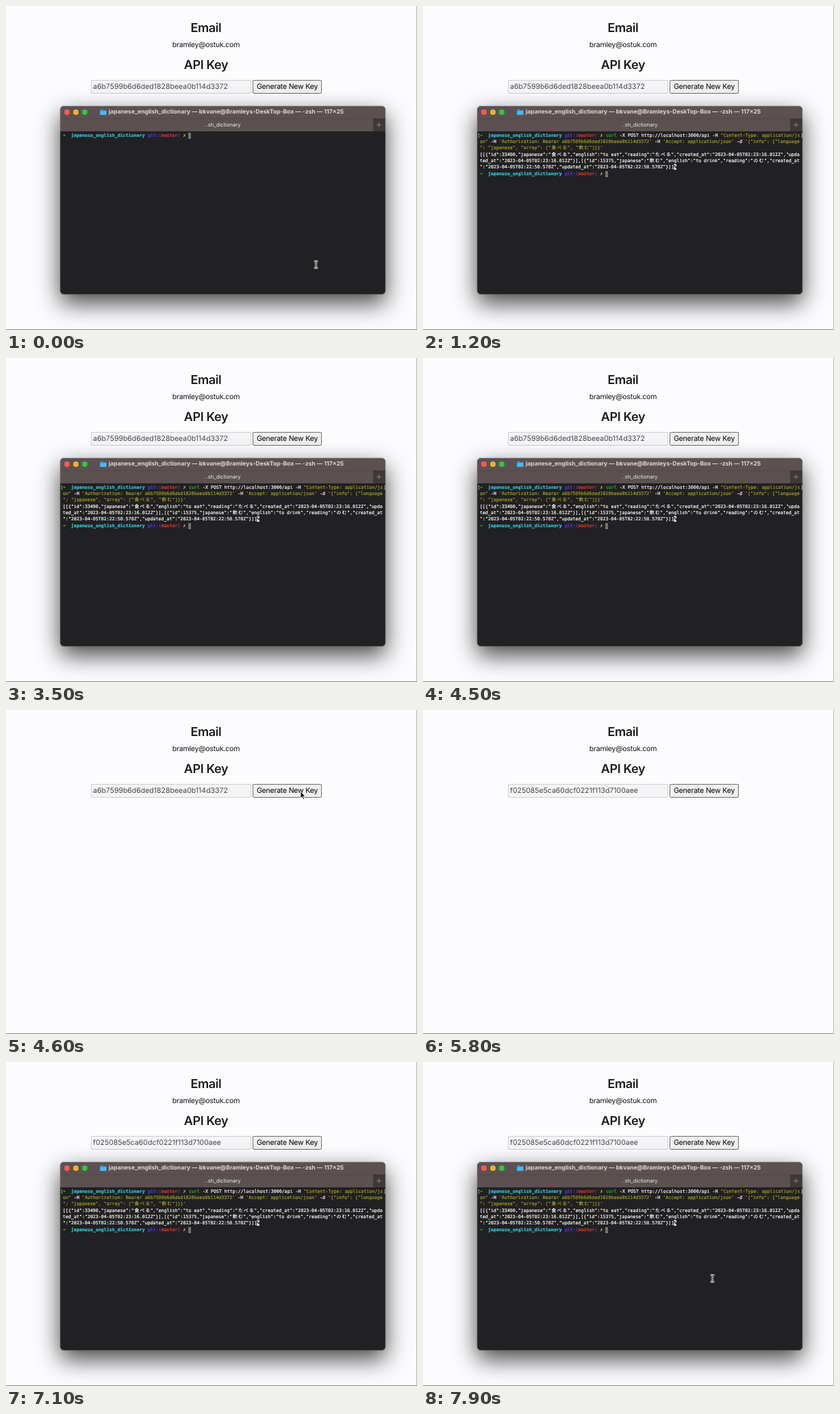
These frames come from a looping animation (600 px wide and 473 px high, 8 s). An HTML page:

```html
<!DOCTYPE html>
<html lang="en">
<head>
<meta charset="utf-8">
<title>API key demo</title>
<style>
  html, body { margin: 0; width: 100%; height: 100%; overflow: hidden; background: #fcfbfd; }
  .stage {
    position: relative; width: 600px; height: 473px; overflow: hidden; box-sizing: border-box;
    background: #fcfbfd; border-right: 1px solid #b4b3b5; border-bottom: 1px solid #8d8c8e;
    font-family: Inter, "Liberation Sans", sans-serif; color: #1d1d1f;
    text-rendering: geometricPrecision; cursor: default;
  }
  .stage div, .stage svg, .key span { position: absolute; white-space: pre; box-sizing: border-box; }
  .mid { left: 0; width: 584px; height: 20px; line-height: 20px; text-align: center; }
  .head { font-size: 18px; font-weight: 600; letter-spacing: -.4px; }
  .mail { font-size: 10.5px; letter-spacing: -.2px; color: #111; }
  .key, .button { top: 108px; height: 20px; line-height: 18px; font-size: 10.5px; }
  .key {
    left: 124px; width: 234px; color: #464648;
    background: #f5f4f6; border: 1px solid #d0cfd2; border-radius: 2px;
  }
  .key span { left: 2px; top: 0; }
  .button {
    left: 360px; width: 101px; text-align: center; letter-spacing: -.2px; color: #000;
    background: #efeff0; border: 1px solid #707072; border-radius: 2px;
  }

  /* terminal window */
  .window {
    left: 79px; top: 146px; width: 475px; height: 275px; border-radius: 6px;
    background: #212022; box-shadow: 0 13px 34px rgba(0,0,0,.72), 0 0 1px rgba(0,0,0,.7);
  }
  .bar { left: 0; top: 0; width: 475px; height: 37px; background: #5b5150; border-radius: 6px 6px 0 0; }
  .bar::after {
    content: ""; position: absolute; left: 0; top: 18px; width: 475px; height: 1px; background: #514746;
  }
  .rim { inset: 0; border: 1px solid rgba(255,255,255,.13); border-radius: 6px; }
  .dot { top: 5px; width: 8px; height: 8px; border-radius: 50%; }
  .title { left: 71px; top: 3.3px; line-height: 12px; font-size: 8.55px; font-weight: 700; color: #dcd8d7; }
  .tab { left: 0; width: 475px; top: 22px; line-height: 12px; font-size: 7.6px; text-align: center; color: #f0eeed; }
  .plus { left: 457px; top: 18px; width: 18px; height: 19px; background: #403837; }

  /* text grid: 4px columns */
  .grid {
    left: 4px; top: 38.6px; color: #fff; -webkit-text-stroke: .18px;
    font: 6.645px/9.33px "DejaVu Sans Mono", monospace;
  }
  .row { left: 0; height: 9.33px; line-height: 9.33px; }
  .cell, .wide { display: inline-block; width: 4px; line-height: 0; text-align: center; }
  .wide { width: 8px; font-family: "Noto Sans CJK JP", "Noto Sans CJK", sans-serif; }
  .b { font-weight: 700; }
  .green { color: #2fbd2f; }
  .cyan { color: #2ccbd8; }
  .blue { color: #4a35d6; }
  .red { color: #dc2f24; }
  .yellow { color: #c9c61e; }
  .olive { color: #a5a31c; }
  .mark { color: #b5b5b5; }
  .inv { background: #e4e4e4; color: #212022; }
  .block { width: 4px; height: 9px; background: #727274; }

  /* timeline */
  .window, .old, .new, .button, .cmd, .out, .block, .arrow, .beam { animation: 8s step-end infinite; }
  .window { animation-name: window; }
  .old { animation-name: old; }
  .new { animation-name: new; }
  .button { animation-name: press; }
  .cmd { animation-name: paste; }
  .out { animation-name: answer; }
  .block { animation-name: caret; }
  .arrow { animation-name: arrow; }
  .beam { animation-name: beam; }
  @keyframes window { 0% { opacity: 1 } 57.5% { opacity: 0 } 81.25%, 100% { opacity: 1 } }
  @keyframes old { 0% { opacity: 1 } 65%, 100% { opacity: 0 } }
  @keyframes new { 0% { opacity: 0 } 65%, 100% { opacity: 1 } }
  @keyframes press { 0% { background: #efeff0 } 63.75% { background: #dcdcde } 65%, 100% { background: #efeff0 } }
  @keyframes paste { 0% { opacity: 0 } 6.25%, 100% { opacity: 1 } }
  @keyframes answer { 0% { opacity: 0 } 15%, 100% { opacity: 1 } }
  @keyframes caret {
    0% { transform: translate(183px, 0) }
    6.25% { transform: translate(180px, 18.66px) }
    15%, 100% { transform: translate(183px, 56px) }
  }
  @keyframes arrow {
    0% { opacity: 0; transform: translate(430px, 119px) }
    57.5% { opacity: 1; transform: translate(430px, 119px) }
    68.75% { opacity: 1; transform: translate(426px, 180px) }
    70% { opacity: 1; transform: translate(414px, 310px) }
    71.25% { opacity: 1; transform: translate(404px, 427px) }
    72.5%, 100% { opacity: 0; transform: translate(404px, 427px) }
  }
  @keyframes beam {
    0% { opacity: 1; transform: translate(452.5px, 377.5px) }
    6.25% { opacity: 0; transform: translate(452.5px, 377.5px) }
    95% { opacity: 1; transform: translate(429px, 298px) }
    96.25% { opacity: 1; transform: translate(425px, 309px) }
    97.5%, 100% { opacity: 1; transform: translate(422.5px, 316px) }
  }
</style>
</head>
<body>
<div class="stage">
  <div class="mid head" style="top:23px">Email</div>
  <div class="mid mail" style="top:46.5px">bramley@ostuk.com</div>
  <div class="mid head" style="top:77px">API Key</div>
  <div class="key"><span class="old">a6b7599b6d6ded1828beea0b114d3372</span><span class="new">f025085e5ca60dcf0221f113d7100aee</span></div>
  <div class="button">Generate New Key</div>

  <div class="window">
    <div class="bar"></div>
    <div class="dot" style="left:5.5px;background:#fb5a54"></div>
    <div class="dot" style="left:18.7px;background:#e8b431"></div>
    <div class="dot" style="left:32px;background:#34c447"></div>
    <svg style="left:58px;top:4px" width="10" height="10" viewBox="0 0 11 10" preserveAspectRatio="none">
      <path d="M.5 1.6Q.5.8 1.3.8H4L5 1.9H9.6Q10.4 1.9 10.4 2.7V8.2Q10.4 9 9.6 9H1.3Q.5 9 .5 8.2Z" fill="#2a95d3"/>
      <path d="M.5 3.2H10.4V8.2Q10.4 9 9.6 9H1.3Q.5 9 .5 8.2Z" fill="#4cb9ee"/>
    </svg>
    <div class="title">japanese_english_dictionary — bkvane@Bramleys-DeskTop-Box — -zsh — 117×25</div>
    <div class="tab">..sh_dictionary</div>
    <div class="plus"><svg width="18" height="19"><path d="M5 9.5h7M8.5 6v7" stroke="#857c7a" fill="none"/></svg></div>
    <div class="grid" id="grid"><div class="block"></div></div>
    <div class="rim"></div>
  </div>

  <svg class="arrow" style="left:0;top:0;overflow:visible" width="1" height="1">
    <path d="M0 0V9.8L2.3 7.7L4 11.4L5.6 10.7L4 7.1H7Z" fill="#000" stroke="#fff" stroke-width=".9"/>
  </svg>
  <svg class="beam" style="left:0;top:0;overflow:visible" width="1" height="1" fill="none">
    <defs><path id="stem" d="M-2.6 -5Q0 -5 0 -3V3Q0 5 2.6 5M2.6 -5Q0 -5 0 -3M0 3Q0 5 -2.6 5M-1.4 0H1.4"/></defs>
    <use href="#stem" stroke="#fff" stroke-width="2.4"/>
    <use href="#stem" stroke="#2a2a2c" stroke-width=".8"/>
  </svg>
</div>
<script>
  const grid = document.getElementById('grid');
  const ink = (cls, text) => `<span class="${cls}">${text}</span>`;
  const str = text => ink('olive', text);

  // Glyphs outside the plain set get a box of their exact column width.
  const fit = html => html
    .replace(/[\u3040-\u9fff]/g, '<span class="wide">$&</span>')
    .replace(/[➜✗]/g, '<span class="cell">$&</span>');

  function put(line, col, html, cls = '') {
    const row = document.createElement('div');
    row.className = 'row ' + cls;
    row.style.cssText = `top:${line * 9.33}px;left:${col * 4}px`;
    row.innerHTML = fit(html);
    grid.append(row);
  }

  const prompt = ink('b green', '➜') + '  ' + ink('b cyan', 'japanese_english_dictionary') + ' ' +
    ink('b blue', 'git:(') + ink('b red', 'master') + ink('b blue', ')') + ' ' + ink('b yellow', '✗');

  put(0, 0, prompt);

  put(0, 46, ink('green', 'curl') + ' -X POST http://localhost:3000/api -H ' +
    str('"Content-Type: application/js'), 'cmd');
  put(1, 0, str('on"') + ' -H ' + str("'Authorization: Bearer a6b7599b6d6ded1828beea0b114d3372'") +
    ' -H ' + str("'Accept: application/json'") + ' -d ' + str(`'{"info": {"language`), 'cmd');
  put(2, 0, str(`": "japanese", "array": ["食べる", "飲む"]}}'`), 'cmd');

  put(0, -.9, '[', 'out mark');
  put(0, 117, ']', 'out mark');
  put(3, 0, '[[{"id":33490,"japanese":"食べる","english":"to eat","reading":"たべる",' +
    '"created_at":"2023-04-05T02:23:16.012Z","upda', 'out');
  put(4, 0, 'ted_at":"2023-04-05T02:23:16.012Z"}],[{"id":15375,"japanese":"飲む",' +
    '"english":"to drink","reading":"のむ","created_at', 'out');
  put(5, 0, '":"2023-04-05T02:22:50.570Z","updated_at":"2023-04-05T02:22:50.570Z"}]]' +
    ink('b inv', '%'), 'out');
  put(6, 0, prompt, 'out');
</script>
</body>
</html>
```
